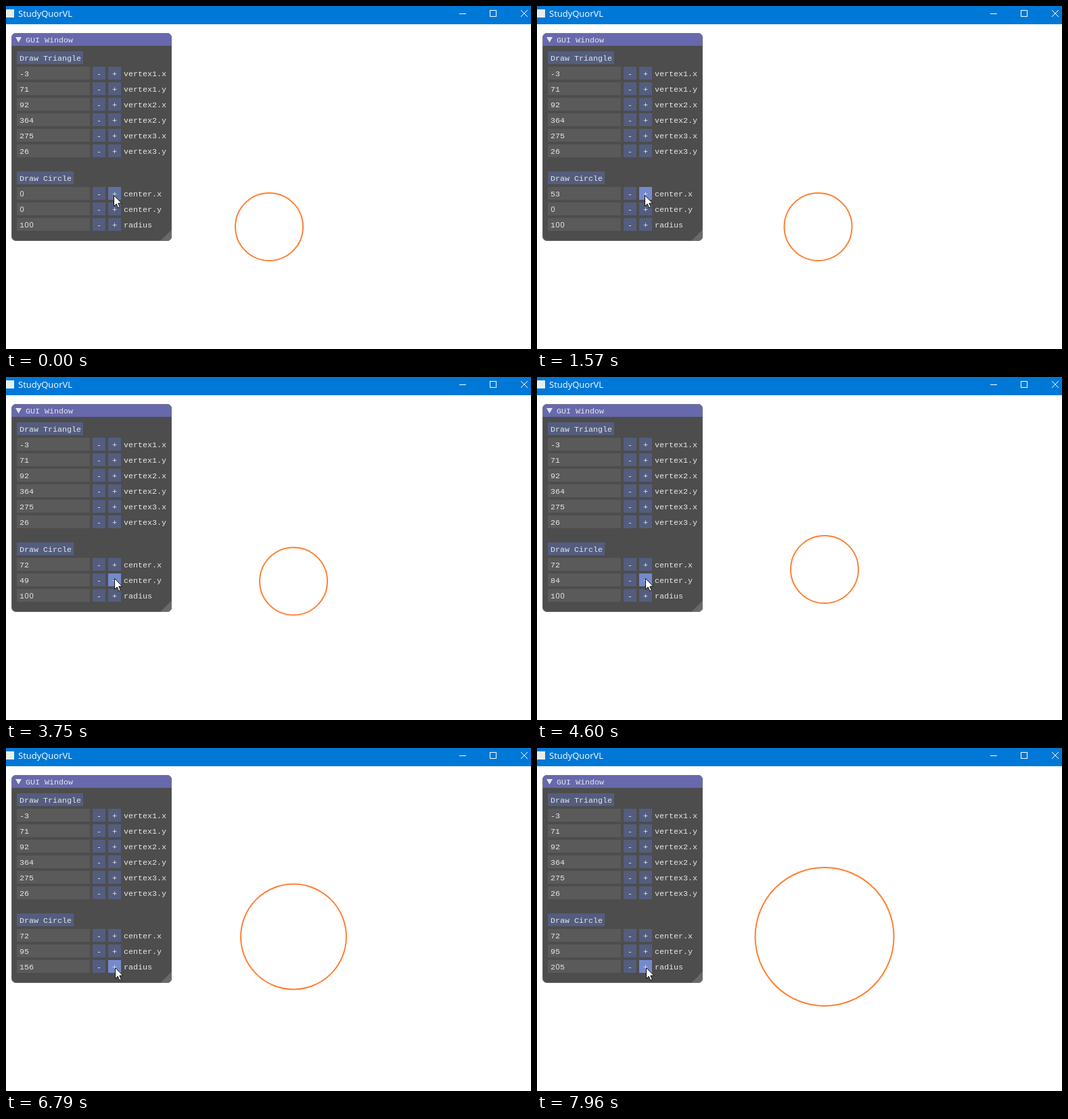
These frames come from a looping animation (776 px wide and 508 px high, 8 s). An HTML page with a canvas:

```html
<!DOCTYPE html>
<html lang="en">
<head>
<meta charset="utf-8">
<title>Circle controls</title>
<style>
html, body { margin: 0; width: 100%; height: 100%; overflow: hidden; background: #fff; }
canvas { display: block; }
</style>
</head>
<body>
<canvas id="stage" width="776" height="508"></canvas>
<script>
const ctx = document.getElementById('stage').getContext('2d');
const LOOP = 8000;
const RATE = 0.04125; // counter steps per ms while a button is held

const marks = [
  [140, 1], [1150, 7], [1270, 1], [1570, 2], [1700, 1], [2200, 4], [2350, 1],
  [2660, 2], [2780, 1], [3590, 6], [3750, 1], [3900, 1], [4740, 6], [4890, 1],
  [5580, 5], [5820, 2], [5970, 1], [6790, 6], [6940, 1], [7090, 1], [7960, 7]
];
const ticks = [0];
for (const [end, n] of marks) {
  const start = ticks[ticks.length - 1];
  for (let i = 1; i <= n; i++) ticks.push(start + (end - start) * i / n);
}

const fixedRows = [
  ['-3', 'vertex1.x'], ['71', 'vertex1.y'], ['92', 'vertex2.x'],
  ['364', 'vertex2.y'], ['275', 'vertex3.x'], ['26', 'vertex3.y']
];
const button = { idle: '#545d7e', hover: '#61719f', active: '#758acc' };

const clamp = (v, lo, hi) => Math.min(hi, Math.max(lo, v));
const count = (t, start, max) => clamp(Math.floor((t - start) * RATE), 0, max);
const slide = (t, a, b) => clamp((t - a) / (b - a), 0, 1);

function stateAt(t) {
  const first = slide(t, 2085, 2225);
  const second = slide(t, 4960, 5160);
  return {
    x: count(t, 273, 72),
    y: count(t, 2551, 95),
    radius: 100 + count(t, 5412, 105),
    mouseX: 159 + Math.round(first) + Math.round(second),
    mouseY: Math.round(280 + 18 * first + 27 * second),
    held: (t >= 100 && t < 2040) || (t >= 2280 && t < 4950) || t >= 5200
  };
}

function box(x, y, w, h, color) {
  ctx.fillStyle = color;
  ctx.fillRect(x, y, w, h);
}

function poly(points, color) {
  ctx.beginPath();
  points.forEach(([x, y]) => ctx.lineTo(x, y));
  ctx.closePath();
  ctx.fillStyle = color;
  ctx.fill();
}

// Fixed 7px cells; the plain zero comes from a sans face
function mono(str, x, base) {
  ctx.fillStyle = '#e6e6e6';
  ctx.textAlign = 'center';
  [...str].forEach((c, i) => {
    ctx.font = c === '0'
      ? '11px "Liberation Sans", sans-serif'
      : '11.67px "Liberation Mono", monospace';
    ctx.fillText(c, x + 7 * i + 3.5, base);
  });
}

function textButton(str, y) {
  box(16, y, str.length * 7 + 7, 19, button.idle);
  mono(str, 20, y + 14);
}

function row(value, label, y, s) {
  const over = s.mouseX >= 151 && s.mouseX < 170 && s.mouseY >= y && s.mouseY < y + 19;
  box(16, y, 108, 19, '#5a5a5a');
  box(128, y, 19, 19, button.idle);
  box(151, y, 19, 19, button[over ? (s.held ? 'active' : 'hover') : 'idle']);
  mono(String(value), 20, y + 14);
  mono('-', 134, y + 14);
  mono('+', 157, y + 14);
  mono(label, 174, y + 14);
}

function titleBar() {
  box(0, 0, 776, 27, '#0078d7');
  box(0, 5, 12, 12, '#e6efec');
  ctx.fillStyle = '#fff';
  ctx.textAlign = 'left';
  ctx.font = '13px "Open Sans", sans-serif';
  ctx.fillText('StudyQuorVL', 18, 16);
  box(670, 11, 10, 1, '#fff');
  ctx.strokeStyle = '#fff';
  ctx.lineWidth = 1;
  ctx.strokeRect(715.5, 6.5, 9, 9);
  ctx.beginPath();
  ctx.moveTo(761, 6);
  ctx.lineTo(771, 16);
  ctx.moveTo(771, 6);
  ctx.lineTo(761, 16);
  ctx.stroke();
}

function panel(s) {
  ctx.save();
  ctx.beginPath();
  ctx.roundRect(8, 40, 237, 308, 7);
  ctx.clip();
  box(8, 40, 237, 308, '#4d4d4d');
  box(8, 40, 237, 19, '#6868ad');
  poly([[228, 348], [245, 331], [245, 348]], '#696969');
  ctx.restore();

  ctx.beginPath();
  ctx.roundRect(8.5, 40.5, 236, 307, 6.5);
  ctx.strokeStyle = 'rgba(128,128,128,0.5)';
  ctx.lineWidth = 1;
  ctx.stroke();

  poly([[14, 46], [23, 46], [18.5, 54]], '#e6e6e6');
  mono('GUI Window', 29, 54);
  textButton('Draw Triangle', 67);
  fixedRows.forEach(([value, label], i) => row(value, label, 90 + 23 * i, s));
  textButton('Draw Circle', 245);
  row(s.x, 'center.x', 268, s);
  row(s.y, 'center.y', 291, s);
  row(s.radius, 'radius', 314, s);
}

function circle(s) {
  ctx.beginPath();
  ctx.arc(389 + s.x / 2, 327 - s.y / 2, s.radius / 2, 0, Math.PI * 2);
  ctx.strokeStyle = '#ff8033';
  ctx.lineWidth = 2;
  ctx.stroke();
}

function pointer(x, y) {
  ctx.save();
  ctx.translate(x + 0.5, y + 0.5);
  poly([[0, 0], [0, 16], [3.7, 12.6], [6.3, 18.5], [8.8, 17.4], [6.3, 11.6], [11.3, 11.6]], '#fff');
  ctx.strokeStyle = '#111';
  ctx.lineWidth = 1;
  ctx.stroke();
  ctx.restore();
}

function draw(time) {
  const s = stateAt(time);
  box(0, 0, 776, 508, '#fff');
  circle(s);
  titleBar();
  panel(s);
  pointer(s.mouseX, s.mouseY);
}

const begin = performance.now();
function loop(now) {
  const t = Math.max(0, now - begin) % LOOP;
  let i = ticks.length - 1;
  while (i > 0 && ticks[i] > t) i--;
  draw(ticks[i]);
  requestAnimationFrame(loop);
}
draw(0);
requestAnimationFrame(loop);
</script>
</body>
</html>
```
